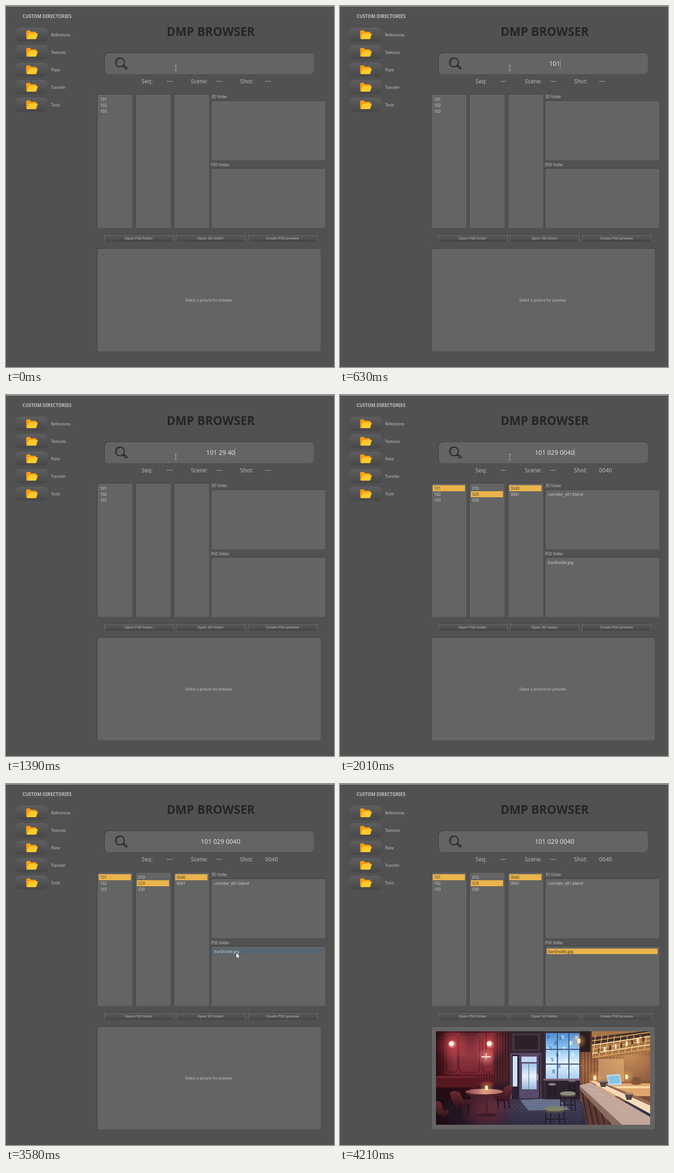
These frames come from a looping animation (714 px wide and 784 px high, 4680 ms). An HTML page with a canvas:

```html
<!DOCTYPE html>
<html lang="en">
<head>
<meta charset="utf-8">
<title>DMP Browser</title>
<style>
html, body { margin: 0; width: 100%; height: 100%; overflow: hidden; background: #515151; }
canvas { display: block; }
</style>
</head>
<body>
<canvas id="stage" width="714" height="784"></canvas>
<script>
const W = 714, H = 784, LOOP = 4680;
const FONT = '"Noto Sans", "Open Sans", sans-serif';
const GOLD = '#ebb44c', LABEL = '#c2c2c2';
const stage = document.getElementById('stage').getContext('2d');
let c = stage;

const TYPED = [[0, ''], [310, '1'], [460, '10'], [630, '101'], [780, '101 '], [960, '101 2'],
  [1100, '101 29'], [1260, '101 29 4'], [1390, '101 29 40'], [2010, '101 029 0040']];
const CARET = [[0, false], [310, true], [2490, false], [2970, true], [3580, false]];
const ARROW = [[0, null], [3140, [424, 236]], [3260, [480, 334]], [3430, [504, 359]],
  [3580, [501, 366]], [3900, [500, 398]], [4060, [446, 772]], [4210, null]];

function at(steps, t) {
  let value;
  for (const [start, v] of steps) if (t >= start) value = v;
  return value;
}

function vertical(y0, y1, ...colors) {
  const g = c.createLinearGradient(0, y0, 0, y1);
  colors.forEach((color, i) => g.addColorStop(i / (colors.length - 1), color));
  return g;
}

function across(x0, x1, ...colors) {
  const g = c.createLinearGradient(x0, 0, x1, 0);
  colors.forEach((color, i) => g.addColorStop(i / (colors.length - 1), color));
  return g;
}

function rect(color, x, y, w, h) {
  c.fillStyle = color;
  c.fillRect(x, y, w, h);
}

function round(color, x, y, w, h, r) {
  c.fillStyle = color;
  c.beginPath();
  c.roundRect(x, y, w, h, r);
  c.fill();
}

function trace(points) {
  c.beginPath();
  for (let i = 0; i < points.length; i += 2) c.lineTo(points[i], points[i + 1]);
}

function poly(color, ...points) {
  trace(points);
  c.fillStyle = color;
  c.fill();
}

function line(color, width, ...points) {
  trace(points);
  c.strokeStyle = color;
  c.lineWidth = width;
  c.stroke();
}

function oval(color, x, y, rx, ry = rx) {
  c.fillStyle = color;
  c.beginPath();
  c.ellipse(x, y, rx, ry, 0, 0, 7);
  c.fill();
}

function glow(rgb, x, y, r, alpha) {
  const g = c.createRadialGradient(x, y, 0, x, y, r);
  g.addColorStop(0, `rgba(${rgb},${alpha})`);
  g.addColorStop(1, `rgba(${rgb},0)`);
  rect(g, x - r, y - r, 2 * r, 2 * r);
}

function text(str, x, y, size, color = LABEL, align = 'left', weight = 400) {
  c.font = `${weight} ${size}px ${FONT}`;
  c.textAlign = align;
  c.fillStyle = color;
  c.fillText(str, x, y);
}

function panel(x, y, w, h, r = 4) {
  round('#3b3b3b', x - 1, y - 1, w, h, r);
  round('#646464', x, y, w, h, r);
}

function folder(x, y) {
  poly('#ff9c0e', x, y + 1.5, x + 1.5, y, x + 8, y, x + 10.5, y + 3, x + 21, y + 3,
    x + 22, y + 5, x + 20, y + 18, x + 1, y + 18, x, y + 16.5);
  poly('#ffca2c', x + 6, y + 6.5, x + 24, y + 6.5, x + 25, y + 8, x + 22, y + 18,
    x + 20.5, y + 19, x + 1, y + 19);
}

function magnifier() {
  c.strokeStyle = '#151515';
  c.lineWidth = 1.7;
  c.beginPath();
  c.arc(248, 122.5, 9.7, 0, 7);
  c.stroke();
  c.lineWidth = 0.9;
  c.beginPath();
  c.arc(248, 122.5, 7, 2.7, 4.6);
  c.stroke();
  c.lineCap = 'round';
  line('#151515', 1.6, 254.5, 129.5, 257, 131.5);
  line('#151515', 5, 258, 132, 261.8, 135);
  line('#646464', 2.2, 258.2, 132.2, 261.6, 134.8);
  c.lineCap = 'butt';
}

function button(label, x) {
  rect('#3c3c3c', x, 495, 151, 16);
  rect(vertical(496, 510, '#5d5d5d', '#494949'), x + 1, 496, 149, 14);
  rect('#707070', x, 496, 1, 15);
  rect('#707070', x + 150, 496, 1, 15);
  text(label, x + 75, 507, 7.9, LABEL, 'center');
}

function column(x, items, picked) {
  items.forEach((item, i) => {
    if (i === picked) rect(GOLD, x + 3, 196 + 13 * i, 70, 13);
    text(item, x + 6, 205.5 + 13.2 * i, 8.3, i === picked ? '#4a3d28' : '#d0d0d0');
  });
}

function arrow([x, y]) {
  const pts = [x, y, x, y + 12.5, x + 2.8, y + 10, x + 4.8, y + 14.6, x + 6.8, y + 13.7,
    x + 4.9, y + 9.3, x + 8.8, y + 9.1, x, y];
  poly('#fff', ...pts);
  line('#222', 0.8, ...pts);
}

function stool(x, y, rx, ry, height, seat) {
  const depth = rx * 0.4;
  for (const k of [-0.85, -0.4, 0.4, 0.85])
    line('#1d1824', 1.8, x + rx * k, y, x + rx * k * 1.15, y + height);
  line('#1d1824', 1.4, x - rx * 0.95, y + height * 0.65, x + rx * 0.95, y + height * 0.65);
  round('#57504a', x - rx, y, rx * 2, depth, [0, 0, rx / 3, rx / 3]);
  oval(seat, x, y, rx, ry);
}

function chair(x, y, s) {
  poly(vertical(y - 4, y + 32, '#6e2b33', '#32131d'), x, y, x + 10 * s, y - 4, x + 22 * s, y,
    x + 30 * s, y + 17, x + 50 * s, y + 16, x + 49 * s, y + 25, x + 38 * s, y + 32,
    x + 12 * s, y + 29, x + 3 * s, y + 14);
  for (const k of [12, 24, 42])
    line('#1c0c14', 2, x + k * s, y + 27, x + (k - 3) * s, y + 47);
}

function leftWall() {
  rect(vertical(537, 655, '#4a1822', '#76242f', '#5f1b26'), 209, 537, 160, 120);
  for (let x = 211; x < 369; x += 6) rect('rgba(25,5,10,.35)', x, 537, 2, 110);
  rect(vertical(541, 630, '#6a2731', '#923843', '#78262f'), 229, 541, 108, 89);
  c.strokeStyle = '#4d1a25';
  c.lineWidth = 1.5;
  for (const [x, w] of [[232, 24], [259, 45], [310, 24]]) {
    c.beginPath();
    c.roundRect(x, 545, w, 81, 8);
    c.stroke();
  }
  rect(vertical(537, 690, '#2c1820', '#3c1c25'), 336, 537, 33, 148);
  for (let x = 338; x < 369; x += 6) rect('#64282e', x, 537, 2.5, 110);
  rect(across(209, 250, 'rgba(20,4,10,.65)', 'rgba(20,4,10,0)'), 209, 537, 41, 110);
}

function floor() {
  rect(vertical(655, 740, '#2a1622', '#403a53', '#2c2a40'), 209, 655, 466, 85);
  rect(across(209, 400, '#1c0b14', 'rgba(40,18,32,0)'), 209, 655, 191, 85);
  glow('170,45,55', 320, 705, 60, 0.45);
  poly('#65708c', 392, 686, 474, 682, 500, 708, 410, 709);
  for (let y = 686; y < 739; y += 5)
    for (let x = 365 + y % 2 * 5; x < 520; x += 11) rect('rgba(150,160,190,.16)', x, y, 7, 1.5);
}

function doorAndWindow() {
  rect('#33242f', 369, 537, 77, 147);
  rect('#46333f', 375, 542, 61, 38);
  rect('#2d202a', 380, 546, 51, 30);
  rect('#5b4a67', 371, 584, 67, 100);
  rect('#2b2133', 374, 588, 62, 96);
  rect('#cfe2f8', 376, 591, 10, 66);
  rect('#584a69', 390, 588, 43, 95);
  rect('#c2d8f2', 395, 592, 33, 12);
  rect(vertical(607, 663, '#a2c3e8', '#e8f3ff', '#9bb6d6'), 396, 607, 32, 56);
  line('#6f7f9f', 1.5, 411, 607, 411, 663);
  rect('#d0b8bd', 429, 630, 2, 14);

  rect('#3a2e42', 445, 537, 80, 148);
  rect(vertical(541, 639, '#4f8fd0', '#8cc4f2', '#e4f3ff', '#a9cff0'), 448, 541, 73, 99);
  for (let i = 0; i < 22; i++)
    rect(i % 3 ? 'rgba(235,247,255,.6)' : 'rgba(50,105,165,.5)',
      450 + i * 23 % 65, 545 + i * 37 % 86, 6, 8);
  for (const x of [472, 497]) rect('#43597f', x, 541, 2.5, 99);
  for (const y of [575, 607]) rect('#43597f', 448, y, 73, 2.5);
  rect('#7e6172', 443, 640, 83, 4);
  rect('#2f2230', 447, 645, 76, 39);
}

function backBar() {
  rect(vertical(537, 690, '#5a3527', '#a86b47', '#774b34'), 523, 537, 152, 153);
  for (let x = 525; x < 675; x += 7) rect('rgba(45,20,16,.35)', x, 537, 2, 120);
  rect('#2c1c20', 523, 537, 22, 45);
  rect('#c08e62', 562, 597, 56, 50);
  rect('#8f5c40', 618, 590, 57, 55);
  glow('255,195,115', 630, 580, 75, 0.55);
  poly('#a87548', 548, 537, 675, 537, 675, 582, 556, 596, 548, 585);
  poly('#46302a', 548, 550, 660, 537, 675, 537, 675, 546, 549, 568);
  for (let i = 0; i < 5; i++)
    line(i % 2 ? '#ffe3a4' : '#e0a85c', 2, 549, 558 + i * 9, 675, 539 + i * 9);
  for (let i = 0; i < 9; i++) {
    line('#f6d28c', 1.2, 556 + i * 14, 546, 550 + i * 14, 592 - i * 2);
    rect(i % 2 ? '#fff0c8' : '#5c3a2b', 562 + i * 12, 574 - i * 3, 4, 10);
  }
  rect('#dfa56b', 557, 650, 118, 28);
  rect('#f9d7a4', 590, 656, 85, 5);
}

function counter() {
  poly('#5e3b33', 522, 658, 675, 727, 675, 740, 536, 740);
  for (let i = 0; i < 7; i++)
    line('#38212a', 2.5, 526 + i * 12, 664 + i * 9, 540 + i * 12, 740);
  poly('#886a60', 521, 655, 618, 740, 592, 740, 522, 664);
  poly('#c2a79a', 521, 655, 545, 648, 675, 723, 675, 740, 614, 740);
  poly('#f6dcbc', 543, 645, 554, 644, 675, 698, 675, 716);
  poly('#9a6a50', 554, 644, 562, 644, 675, 690, 675, 698);
  for (let i = 0; i < 6; i++)
    line('rgba(240,225,218,.45)', 1, 540 + i * 17, 660 + i * 11, 560 + i * 16, 665 + i * 12);
  poly('#b9daee', 580, 632, 609, 630, 614, 653, 585, 655);
  poly('#86c3e8', 583, 635, 607, 633, 610, 649, 587, 651);
  for (const y of [640, 645, 650]) oval('#80573c', 645, y, 11, 3.5);
  for (const [x, y] of [[573, 651], [629, 679]]) {
    poly('#53433f', x - 9, y - 6, x + 9, y - 6, x + 5, y + 7, x - 5, y + 7);
    oval('#9a8275', x, y - 6, 9, 2.5);
  }
}

function seating() {
  round('#551720', 209, 634, 90, 44, 5);
  rect('#7c2630', 211, 635, 86, 3);
  rect('#260c14', 209, 659, 75, 26);
  line('#4a242d', 5, 319, 673, 319, 718);
  oval('#3c1d26', 319, 719, 24, 4);
  chair(239, 670, 1);
  chair(376, 658, -0.8);
  chair(207, 692, 0.6);
  oval('#4c2029', 314, 671, 41, 8);
  oval(across(273, 355, '#8a4547', '#d8938a', '#b56b68'), 314, 668, 41, 6);
  stool(462, 652, 8, 2.5, 30, '#8e8387');
  stool(505, 644, 8, 2.5, 30, '#756b76');
  stool(496, 672, 17, 4.5, 38, '#8c8d7c');
  stool(468, 705, 22, 5.5, 35, '#7d8368');
}

function lamps() {
  for (const x of [244, 326]) {
    glow('255,80,85', x, 565, 38, 0.5);
    oval('#d5656c', x, 565, 9);
    oval('#fff4e9', x - 1, 564, 5.5);
  }
  line('#331923', 1, 318, 537, 318, 590);
  glow('255,165,150', 318, 593, 20, 0.6);
  rect('#ffd8cc', 308, 591, 20, 3);
  rect('#f6c3ba', 317, 584, 2, 15);
  for (const [x, y] of [[319, 660], [555, 638], [624, 636], [520, 558]]) {
    glow('255,175,95', x, y, 17, 0.6);
    round('#fff0c6', x - 3, y - 5, 6, 10, 2);
  }
}

function barPhoto() {
  leftWall();
  floor();
  doorAndWindow();
  backBar();
  counter();
  seating();
  lamps();
}

function offscreen(draw) {
  const canvas = document.createElement('canvas');
  canvas.width = W;
  canvas.height = H;
  c = canvas.getContext('2d');
  draw();
  c = stage;
  return canvas;
}

function chrome() {
  rect('#515151', 0, 0, W, H);
  rect('#c8c8c8', 0, 0, W, 1);
  text('CUSTOM DIRECTORIES', 36, 26.3, 9.7, LABEL, 'left', 700);
  ['References', 'Textures', 'Plate', 'Transfer', 'Tools'].forEach((name, i) => {
    const y = Math.round(47 + i * 37.9);
    round(vertical(y, y + 31, '#5f5f5f', '#474747'), 20.5, y, 71, 31, 10);
    folder(44, y + 6);
    text(name, 98, y + 18.7, 8.2);
  });
  text('DMP BROWSER', 445.7, 65, 25.85, '#252525', 'center', 700);
  panel(215, 102, 455, 46, 9);
  magnifier();
  text('Seq:', 295, 167.7, 12.1, '#b8b8b8');
  text('Scene:', 402.5, 167.7, 12.1, '#b8b8b8');
  text('Shot:', 509.5, 167.7, 12.1, '#b8b8b8');
  text('---', 349.5, 167.7, 13.8, '#b8b8b8');
  text('---', 457, 167.7, 13.8, '#b8b8b8');
  for (const x of [199, 282, 366]) panel(x, 192, 76, 290);
  text('3D folder', 447, 200, 8);
  text('PSD folder', 446.5, 347.5, 8);
  panel(447, 206, 248, 129);
  panel(447, 353, 248, 129);
  button('Open PSD folder', 214);
  button('Open 3D folder', 370);
  button('Create PSD preview', 527);
  panel(199, 527, 486, 223);
}

const base = offscreen(chrome);
const photo = offscreen(barPhoto);

function fileRow(chosen) {
  rect(chosen ? GOLD : '#566570', 450, 357, 242, 13);
  if (!chosen) return;
  c.strokeStyle = '#94845f';
  c.lineWidth = 1;
  c.strokeRect(450.5, 357.5, 241, 12);
}

function render(t) {
  const found = t >= 2010, hover = t >= 3430, chosen = t >= 3750;
  c.drawImage(base, 0, 0);

  const query = at(TYPED, t);
  text(query, 467, 130.3, 13.8, '#e0e0e0', 'center');
  if (at(CARET, t)) rect('#a8a8a8', Math.round(467 + c.measureText(query).width / 2), 116, 1, 18);
  text(found ? '0040' : '---', 564, 167.7, found ? 12.2 : 13.8, '#b8b8b8');

  column(199, ['101', '102', '103'], found ? 0 : -1);
  if (found) {
    column(282, ['010', '029', '030'], 1);
    column(365.5, ['0040', '0041'], 0);
    text('corridor_v01.blend', 453, 219.3, 8.6, '#d0d0d0');
    if (hover) fileRow(chosen);
    text('bariInside.jpg', 453, 367, 8.5, chosen ? '#352d20' : '#d0d0d0');
  }

  if (chosen) c.drawImage(photo, 209, 537, 466, 203, 209, 537, 466, 203);
  else text('Select a picture for preview', 441, 642, 8, LABEL, 'center');

  if (t < 3140) {
    rect('#b4b4b4', 369, 129, 1, 11);
    rect('#b4b4b4', 367, 128, 5, 1);
    rect('#b4b4b4', 367, 140, 5, 1);
  }
  const tip = at(ARROW, t);
  if (tip) arrow(tip);
}

const begin = performance.now();
function tick() {
  render((performance.now() - begin) % LOOP);
  requestAnimationFrame(tick);
}
tick();
</script>
</body>
</html>
```
